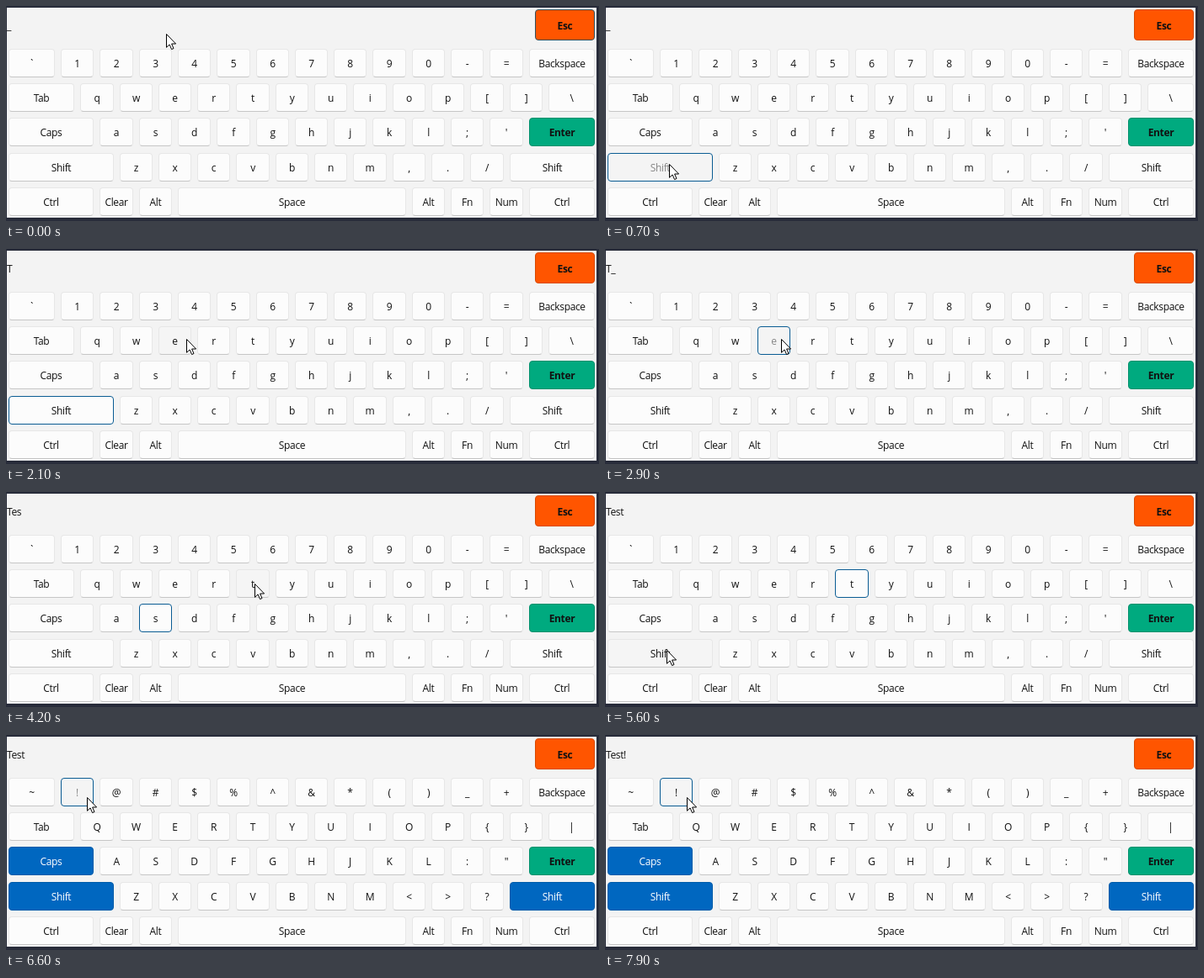
Write an HTML page that moves like this. It is 704 px wide and 256 px high and loops after 8000 ms.

```html
<!DOCTYPE html>
<html lang="en">
<head>
<meta charset="utf-8">
<title>On-screen keyboard</title>
<style>
  html, body { margin: 0; width: 100%; height: 100%; overflow: hidden; }
  body {
    position: relative;
    background: #282c3a;
    font: 12px/17px "Open Sans", "Noto Sans", sans-serif;
    letter-spacing: -.35px;
    color: #111;
    cursor: default;
  }
  #panel { position: absolute; left: 1px; top: 2px; width: 700px; height: 250px; background: #f3f3f3; }
  #text { position: absolute; left: 1px; top: 15px; white-space: pre; }
  .key {
    position: absolute;
    box-sizing: border-box;
    display: flex;
    align-items: center;
    justify-content: center;
    padding-top: 1px;
    border: 1px solid #e7e7e7;
    border-bottom-color: #c6c6c6;
    border-radius: 4px;
    background: #fcfcfc;
    white-space: pre;
  }
  .key.hover { background: #f5f5f5; }
  .key.down { background: #f4f4f4; color: #868686; }
  .key.focus { border-color: #0a5c93; }
  .key.esc, .key.enter { font-weight: 700; }
  .key.esc { background: #ff5500; border-color: #d84800; }
  .key.esc.focus { border-color: #33505c; }
  .key.enter { background: #00aa7f; border-color: #00906c; }
  .key.on { background: #0067c0; border-color: #005ba9; color: #fff; }
  #pointer { position: absolute; left: 0; top: 0; overflow: visible; }
</style>
</head>
<body>
<div id="panel"></div>
<div id="text"></div>
<svg id="pointer" width="13" height="20">
  <path d="M.5 .5V16.3L4.1 12.9L6.6 18.6L9 17.5L6.6 12H11.6Z" fill="#fff" stroke="#000"/>
</svg>
<script>
const LOOP = 8000, STEP = 100, UNIT = 7.716, LEFT = 3.4, GAP = 7;
const rowTops = [51, 92, 133, 175, 216];

// label:width in units; six units by default
const rows = [
  "`:8 1 2 3 4 5 6 7 8 9 0 - = Backspace:11",
  "Tab:11 q w e r t y u i o p [ ] \\:8",
  "Caps:14 a s d f g h j k l ; ' Enter:11",
  "Shift:17 z x c v b n m , . / Shift:14",
  "Ctrl:14 Clear Alt Space:36 Alt Fn Num Ctrl:11"
];
const plain = "`1234567890-=[]\\;',./";
const shifted = "~!@#$%^&*()_+{}|:\"<>?";

const pointer = document.getElementById("pointer");
const text = document.getElementById("text");
const keys = [];

function addKey(label, x, y, w, h) {
  const el = document.createElement("div");
  document.body.insertBefore(el, pointer);
  Object.assign(el.style, { left: x + "px", top: y + "px", width: w + "px", height: h + "px" });
  const upper = label.length > 1 ? label
    : plain.includes(label) ? shifted[plain.indexOf(label)] : label.toUpperCase();
  const kind = { Esc: " esc", Enter: " enter" }[label] || "";
  keys.push({ el, label, upper, kind, x, y, w, h });
}

const column = units => Math.round(LEFT + units * UNIT);

addKey("Esc", 628, 4, 71, 37);
rows.forEach((row, r) => {
  let at = 0;
  for (const item of row.split(" ")) {
    const [, label, size] = item.match(/^(.+?)(?::(\d+))?$/);
    const x = column(at);
    at += Number(size || 6);
    addKey(label, x, rowTops[r], column(at) - GAP - x, 34);
  }
});
const find = label => keys.find(k => k.label === label);

// time, x, y of the pointer tip
const path = [
  [0, 190, 33], [500, 76, 188], [800, 76, 188], [1300, 287, 112],
  [1500, 288, 112], [1700, 80, 194], [1800, 80, 194], [2100, 214, 107],
  [2300, 214, 107], [2500, 209, 107], [3000, 209, 107], [3400, 184, 156],
  [3800, 184, 156], [4200, 295, 109], [5000, 295, 109], [5300, 56, 161],
  [5400, 56, 161], [5600, 73, 188], [5900, 73, 188], [6300, 96, 74],
  [7800, 96, 74], [7900, 97, 74], [LOOP, 97, 74]
];

// key, press time, release time
const clicks = [
  ["Shift", 600, 800], ["t", 1400, 1500], ["Shift", 1700, 1800],
  ["e", 2800, 3000], ["s", 3600, 3800], ["t", 4600, 4800],
  ["Shift", 5700, 5900], ["1", 6600, 6800]
];

const caretOn = [[0, 2000], [2500, 4200], [6800, 7100]];

function pointerAt(t) {
  const i = path.findIndex(p => p[0] > t);
  const [t0, x0, y0] = path[i - 1], [t1, x1, y1] = path[i];
  const f = (t - t0) / (t1 - t0), e = f * f * (3 - 2 * f);
  return [Math.round(x0 + (x1 - x0) * e), Math.round(y0 + (y1 - y0) * e)];
}

function stateAt(t) {
  const s = { typed: "", shift: false, focus: find("Esc"), down: null };
  for (const [label, press, release] of clicks) {
    if (t < press) break;
    const key = s.focus = find(label);
    if (t < release) s.down = key;
    else if (label === "Shift") s.shift = !s.shift;
    else s.typed += s.shift ? key.upper : label;
  }
  return s;
}

function draw(t) {
  const [px, py] = pointerAt(t);
  const s = stateAt(t);
  const caret = caretOn.some(([a, b]) => t >= a && t < b);

  for (const k of keys) {
    const hover = px >= k.x && px < k.x + k.w && py >= k.y && py < k.y + k.h;
    const on = s.shift && (k.label === "Shift" || k.label === "Caps");
    k.el.textContent = s.shift ? k.upper : k.label;
    k.el.className = "key" + (hover ? " hover" : "") + (k === s.down ? " down" : "") +
      (k === s.focus ? " focus" : "") + k.kind + (on ? " on" : "");
  }
  text.textContent = s.typed + (caret ? "_" : "");
  pointer.style.transform = `translate(${px}px, ${py}px)`;
}

const start = performance.now();
let shown = -1;
function tick() {
  const t = Math.floor((performance.now() - start) % LOOP / STEP) * STEP;
  if (t !== shown) draw(shown = t);
  requestAnimationFrame(tick);
}
tick();
</script>
</body>
</html>
```
